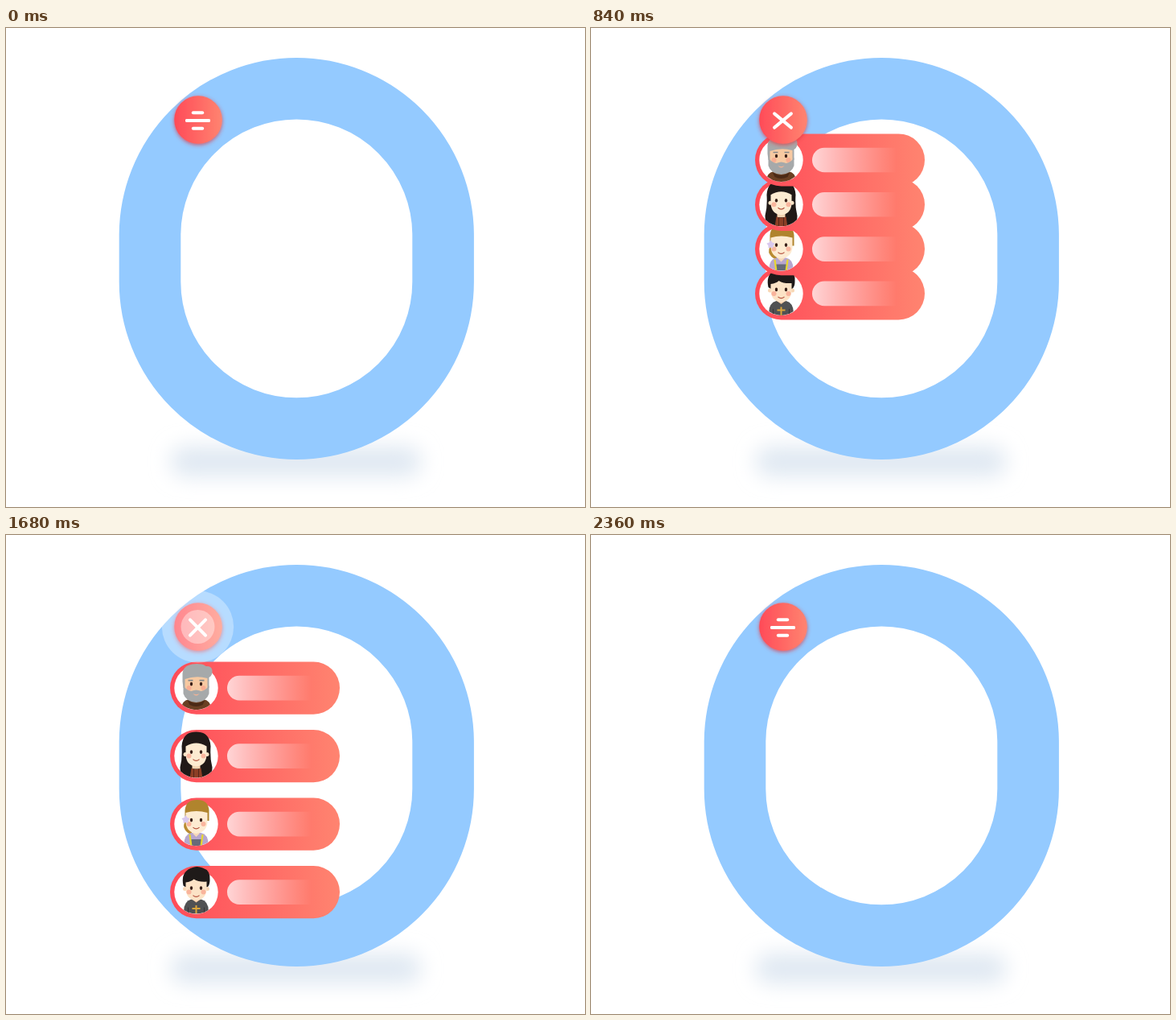
Recreate the animation shown at these times as an HTML page. Size 720x595 px, loop 3000 ms.

```html
<!DOCTYPE html>
<html lang="en">
<head>
<meta charset="utf-8">
<title>Floating menu</title>
<style>
  html, body { margin: 0; width: 100%; height: 100%; overflow: hidden; background: #fff; }
  svg { display: block; width: 100%; height: 100%; }
</style>
</head>
<body>
<svg viewBox="0 0 720 595">
  <defs>
    <linearGradient id="red">
      <stop offset="0" stop-color="#ff4b58"/>
      <stop offset="1" stop-color="#ff8470"/>
    </linearGradient>
    <linearGradient id="fade">
      <stop offset="0" stop-color="#fff" stop-opacity=".74"/>
      <stop offset="1" stop-color="#fff" stop-opacity="0"/>
    </linearGradient>
    <filter id="blur" x="-30%" y="-150%" width="160%" height="400%">
      <feGaussianBlur stdDeviation="13"/>
    </filter>
    <filter id="drop" x="-30%" y="-30%" width="160%" height="160%">
      <feDropShadow dx="0" dy="1.5" stdDeviation="2.6" flood-color="#e0303c" flood-opacity=".75"/>
    </filter>
    <!-- heads may rise above the disc, shoulders stay inside it -->
    <clipPath id="bust"><path d="M-27-40H27V0A27 27 0 0 1-27 0Z"/></clipPath>

    <g id="pill">
      <rect x="204" y="-32.6" width="211" height="65.2" rx="32.6" fill="url(#red)"/>
      <path d="M380-15.3H290.3a15.3 15.3 0 0 0 0 30.6H380Z" fill="url(#fade)"/>
      <circle cx="236.5" r="27.2" fill="#fff"/>
    </g>
    <g id="look">
      <ellipse cx="-6" cy="-5" rx="1.7" ry="2.3" fill="#3a2019"/>
      <ellipse cx="6" cy="-5" rx="1.7" ry="2.3" fill="#3a2019"/>
      <path d="M-9-9.5q3-2 5.500M9-9.5q-3-2-5.500" stroke="#5b3a28" fill="none"/>
      <circle cx="-9" cy="0" r="3" fill="#f8a58e" opacity=".75"/>
      <circle cx="9" cy="0" r="3" fill="#f8a58e" opacity=".75"/>
      <path d="M-.8 0q.8 1 1.600" stroke="#d99a78" fill="none"/>
    </g>
    <path id="smile" d="M-4 4q4 3.500 8 0" stroke="#b5533f" stroke-width="1.200" fill="none"/>

    <g id="face0" clip-path="url(#bust)">
      <path d="M-19 28Q-19 16-9 14H9Q19 16 19 28Z" fill="#6a4023"/>
      <path d="M-11 15Q0 23 11 15L8 21Q0 25-8 21Z" fill="#4b2a16"/>
      <path d="M-17-8V-18Q-16-30 1-30Q9-30 12-27Q20-28 20-20Q20-15 16-13V0H-16Z" fill="#a6a9aa"/>
      <path d="M-14-11Q0-16 14-12V2Q14 15 0 15Q-14 15-14 2Z" fill="#f7c9a1"/>
      <use href="#look"/>
      <path d="M-16-3Q-12 3-6 4Q0 1 6 4Q12 3 16-3V7Q13 17 0 18Q-13 17-16 7Z" fill="#a6a9aa"/>
      <path d="M-4 7q4 2 8 0q-4 5-8 0Z" fill="#f1b295"/>
      <path d="M-10-9.500h6M4-9.500h6" stroke="#85898a" stroke-width="1.700"/>
    </g>
    <g id="face1" clip-path="url(#bust)">
      <path d="M-18-12Q-17-30 0-30Q17-30 18-12Q17 3 20 14Q20 24 15 28H-15Q-20 24-20 14Q-17 3-18-12Z" fill="#201917"/>
      <path d="M-5 8H5V16H-5Z" fill="#f3d4b2"/>
      <path d="M-8 28L-6 15Q0 18 6 15L8 28Z" fill="#8d3f25"/>
      <path d="M-3 16V28M3 16V28" stroke="#55261b"/>
      <circle cx="-13.500" cy="-2" r="2.500" fill="#fbe3c6"/>
      <circle cx="13.500" cy="-2" r="2.500" fill="#fbe3c6"/>
      <path d="M-13-12Q0-20 13-12V-1Q12 12 0 13Q-12 12-13-1Z" fill="#fdebd1"/>
      <use href="#look"/><use href="#smile"/>
    </g>
    <g id="face2" clip-path="url(#bust)">
      <path d="M-11-8Q-18 2-14 7Q-11 12-5 13L-7-4Z" fill="#b98b31"/>
      <path d="M-15 28Q-16 13-6 11H6Q16 13 15 28Z" fill="#b7a6ce"/>
      <path d="M-7 28V19H7V28Z" fill="#666a78"/>
      <path d="M-4 6H4V12L0 16L-4 12Z" fill="#f6d8b8"/>
      <path d="M-8 13L-6 28M8 13L6 28" stroke="#e8d82e" stroke-width="2.200"/>
      <path d="M-14-5V-17Q-13-30 1-30Q15-30 16-17V-4H-14Z" fill="#b0842d"/>
      <path d="M-13-14Q0-18 14-14V-2Q13 10 0 12Q-12 10-13-2Z" fill="#fdebd1"/>
      <use href="#look"/><use href="#smile"/>
      <path d="M-13-11l2 3 3 1-2 3v3l-3-1-3 1V-4l-2-3 3-1Z" fill="#d9c9ee"/>
    </g>
    <g id="face3" clip-path="url(#bust)">
      <path d="M-15 28Q-17 12-6 9H6Q17 12 15 28Z" fill="#505153"/>
      <path d="M-10 28V19M10 28V19" stroke="#343538"/>
      <path d="M-4 5H4V10L0 13L-4 10Z" fill="#f2c9a4"/>
      <path d="M-16-8Q-19-22-10-28Q0-34 8-30Q18-27 17-15Q17-9 14-6H-13Z" fill="#1f1a19"/>
      <circle cx="-14" cy="-4" r="2.500" fill="#f8d7b5"/>
      <circle cx="14" cy="-4" r="2.500" fill="#f8d7b5"/>
      <path d="M-13-12Q-6-13-3-16Q4-12 13-13V-3Q12 9 0 11Q-12 9-13-3Z" fill="#fce3c6"/>
      <use href="#look"/><use href="#smile"/>
      <path d="M0 16.500V27M-5 20.500H5" stroke="#dba53a" stroke-width="2"/>
    </g>
  </defs>

  <rect x="205" y="520" width="311" height="37" rx="18" fill="#dfe8f2" filter="url(#blur)"/>
  <rect x="179" y="75.200" width="364.600" height="422.400" rx="182.300" fill="none" stroke="#94caff" stroke-width="76.600"/>
  <g id="list"></g>
  <circle cx="239" cy="114" r="29.800" fill="url(#red)" filter="url(#drop)"/>
  <g transform="translate(238.500 115)" stroke="#fff" stroke-width="4" stroke-linecap="round">
    <path id="lineA" d="M-13.500 0H13.500"/>
    <path id="lineB" d="M-13.500 0H13.500"/>
    <path id="barA" d="M-5.700 0H5.700"/>
    <path id="barB" d="M-5.700 0H5.700"/>
  </g>
  <g fill="#fff">
    <circle id="wave" cx="238.500" cy="114"/>
    <circle id="dot" cx="238.500" cy="114" r="21"/>
  </g>
</svg>
<script>
const LOOP = 3000, STEP = 40;
const REST = 114.5, FIRST = 190.1, PITCH = 84.5;
const $ = id => document.getElementById(id);
const set = (el, name, value) => el.setAttribute(name, value);
const ramp = (t, a, b) => Math.min(1, Math.max(0, (t - a) / (b - a)));
const swing = u => (1 - Math.cos(Math.PI * u)) / 2;

// Upper entries are added last so they cover the lower ones.
const list = $('list'), items = [];
for (let i = 3; i >= 0; i--) {
  const g = document.createElementNS('http://www.w3.org/2000/svg', 'g');
  g.innerHTML = `<use href="#pill"/><use href="#face${i}" x="236.5"/>`;
  list.append(g);
  items[i] = g;
}

function drawTap(t) {
  const grow = 1 - (1 - ramp(t, 60, 400)) ** 2;
  set($('wave'), 'r', 21 + 27 * grow);
  set($('wave'), 'opacity', 0.33 * ramp(t, 0, 80) * (1 - ramp(t, 280, 400)));
  set($('dot'), 'opacity', 0.45 * ramp(t, 0, 120) * (1 - ramp(t, 260, 400)));
}

function drawIcon(t, open) {
  const angle = 45 * (1 - (1 - open) ** 2);
  const gap = 9.7 * (1 - ramp(t, 400, 720) + ramp(t, 2040, 2360));
  set($('lineA'), 'transform', `rotate(${angle})`);
  set($('lineB'), 'transform', `rotate(${-angle})`);
  set($('barA'), 'transform', `translate(0 ${-gap})`);
  set($('barB'), 'transform', `translate(0 ${gap})`);
  for (const id of ['barA', 'barB']) set($(id), 'opacity', gap > 0.01 ? 1 : 0);
}

function draw(t) {
  const open = swing(ramp(t, 720, 920)) - swing(ramp(t, 1830, 2053));
  drawTap(t < 1400 ? t : t - 1400);
  drawIcon(t, open);
  set(list, 'visibility', open > 0.05 ? 'visible' : 'hidden');
  items.forEach((g, i) => {
    const y = REST + (FIRST + PITCH * i - REST) * open;
    set(g, 'transform', `translate(0 ${y})`);
  });
}

const start = performance.now();
function tick() {
  const t = (performance.now() - start) % LOOP;
  draw(Math.floor(t / STEP) * STEP);
  requestAnimationFrame(tick);
}
tick();
</script>
</body>
</html>
```
